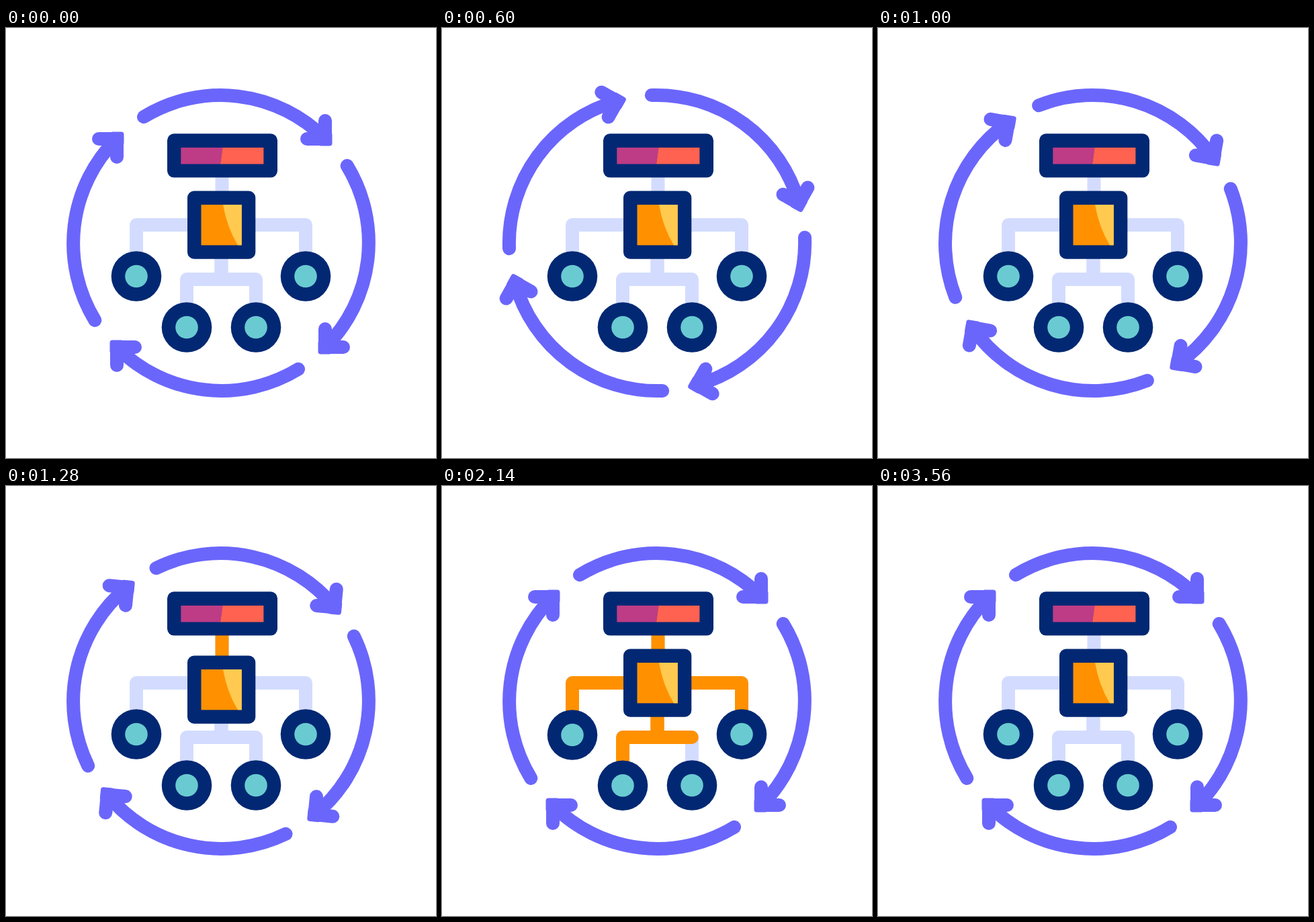
An HTML page that plays this animation: 640 by 640 pixels, repeating every 3.6 s.

```html
<!DOCTYPE html>
<html lang="en">
<head>
<meta charset="utf-8">
<title>Hierarchy cycle</title>
<style>
  html, body { margin: 0; width: 100%; height: 100%; overflow: hidden; background: #fff; }
  svg { display: block; width: 100%; height: 100%; }
  .line { fill: none; stroke-width: 20; stroke-linecap: round; stroke-linejoin: round; }
  .navy { fill: #022873; }
  .teal { fill: #69cbd1; }
</style>
</head>
<body>
<svg viewBox="0 0 640 640">
  <defs>
    <g id="arrow">
      <path class="line" stroke="#6b66fb" d="M205 132.3A219.7 219.7 0 0 1 475 164.7M475 138V165H448"/>
      <rect x="465" y="155" width="20.5" height="20.5" rx="4" fill="#6b66fb"/>
    </g>
    <g id="node">
      <circle class="navy" r="37.3"/>
      <circle class="teal" r="16.8"/>
    </g>
  </defs>
  <g id="ring"></g>
  <g id="base"></g>
  <g id="flow"></g>
  <rect class="navy" x="240" y="157.2" width="164" height="65.4" rx="10"/>
  <path fill="#bd3c85" d="M260.3 178H323L319 202.6H260.3Z"/>
  <path fill="#ff6250" d="M322.6 178H383.4V202.6H319Z"/>
  <g id="box">
    <rect class="navy" x="270" y="242.5" width="101.3" height="101.3" rx="10"/>
    <rect x="290.5" y="263" width="60.3" height="60.3" fill="#ff9100"/>
    <path fill="#ffca4f" d="M323 263H350.8V323.3H345Q329 297 323 263Z"/>
  </g>
  <g id="nodes"></g>
</svg>
<script>
const LOOP = 3600;
const $ = id => document.getElementById(id);

function add(parent, tag, attrs) {
  const el = document.createElementNS('http://www.w3.org/2000/svg', tag);
  for (const k in attrs) el.setAttribute(k, attrs[k]);
  return parent.appendChild(el);
}

// Eased value at time t from a list of [time, value] steps
function track(steps, t) {
  if (t <= steps[0][0]) return steps[0][1];
  for (let i = 1; i < steps.length; i++) {
    const [t0, a] = steps[i - 1], [t1, b] = steps[i];
    if (t < t1) {
      const k = (t - t0) / (t1 - t0);
      return a + (b - a) * k * k * (3 - 2 * k);
    }
  }
  return steps[steps.length - 1][1];
}

const bump = (start, peak, end, size) => [[start, 0], [peak, size], [end, 0]];

const spin = [[0, 0], [286, -25], [976, 100], [1630, 90]];
const boxBump = bump(1090, 1280, 1500, 10);

// Connector path, drawing from/to, clearing from/to
const links = [
  ['M321.5 190V293', 980, 1140, 2680, 2860],
  ['M320.5 293H446V369', 1380, 1780, 2820, 3220],
  ['M320.5 293H194V369', 1400, 1800, 2860, 3300],
  ['M320.5 293V374H269V445', 1650, 2130, 2980, 3440],
  ['M320.5 293V374H372V445', 1750, 2400, 3100, 3560]
].map(([d, in0, in1, out0, out1]) => {
  add($('base'), 'path', { class: 'line', stroke: '#d3dcff', d });
  return {
    el: add($('flow'), 'path', { class: 'line', stroke: '#ff9100', d, pathLength: 1 }),
    head: [[in0, 0], [in1, 1]],
    tail: [[out0, 0], [out1, 1]]
  };
});

const nodes = [
  [446, 369.5, bump(1740, 1940, 2155, 7)],
  [194, 369.5, bump(1770, 1970, 2195, 7)],
  [269, 445.5, bump(2120, 2300, 2520, 7)],
  [372, 445.5, bump(2390, 2600, 2815, 7)]
].map(([x, y, steps]) => ({ x, y, steps, el: add($('nodes'), 'use', { href: '#node' }) }));

for (let a = 0; a < 360; a += 90)
  add($('ring'), 'use', { href: '#arrow', transform: `rotate(${a} 320 320)` });

function draw(t) {
  $('ring').setAttribute('transform', `rotate(${track(spin, t)} 320 320)`);
  $('box').setAttribute('transform', `translate(0 ${track(boxBump, t)})`);
  for (const { el, head, tail } of links) {
    const from = track(tail, t), len = track(head, t) - from;
    el.style.display = len > 0.001 ? '' : 'none';
    el.setAttribute('stroke-dasharray', `${Math.max(len, 0)} 3`);
    el.setAttribute('stroke-dashoffset', -from);
  }
  for (const { el, x, y, steps } of nodes)
    el.setAttribute('transform', `translate(${x} ${y + track(steps, t)})`);
}

const start = performance.now();
function tick() {
  draw((performance.now() - start) % LOOP);
  requestAnimationFrame(tick);
}
tick();
</script>
</body>
</html>
```
